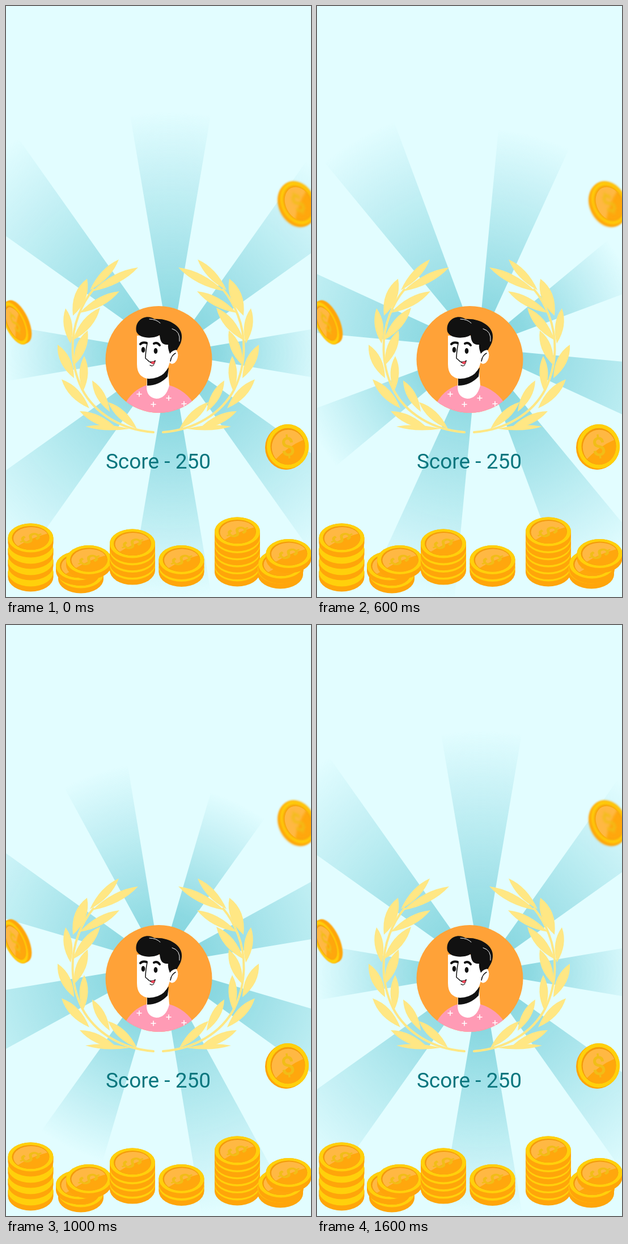
An HTML page with a canvas that plays this animation: 538x1040 px, repeating every 1.8 s.

```html
<!DOCTYPE html>
<html lang="en">
<head>
<meta charset="utf-8">
<title>Score</title>
<style>
  html, body { margin: 0; width: 100%; height: 100%; overflow: hidden; background: #e2fdff; }
  canvas { position: absolute; left: 0; top: 0; }
</style>
</head>
<body>
<canvas id="rays" width="538" height="1040"></canvas>
<canvas id="art" width="538" height="1040"></canvas>
<script>
const TAU = Math.PI * 2, DEG = Math.PI / 180;
const rays = document.getElementById('rays').getContext('2d');
const art = document.getElementById('art').getContext('2d');

// Turn in degrees for each 200 ms step; the last step rests at the start pose.
const TURNS = [0, 5, 14, 30, 47, 64, 82, 93, 0];
// Per ray, counter-clockwise from the right: start length, end length, strong part.
const RAYS = [
  [280, 325, .3], [415, 338, .1], [425, 425, .05], [465, 465, .1],
  [295, 380, .3], [445, 445, .1], [430, 450, .25], [440, 440, .1]
];

function drawRays(turn) {
  rays.clearRect(0, 0, 538, 1040);
  rays.save();
  rays.translate(270, 618);
  rays.rotate(-turn * DEG);
  rays.translate(20, -7);
  RAYS.forEach(([from, to, hold], i) => {
    const length = from + (to - from) * Math.min(1, turn / 82);
    const glow = rays.createRadialGradient(0, 0, 0, 0, 0, length);
    glow.addColorStop(0, 'rgb(127,211,221)');
    glow.addColorStop(hold, `rgba(127,211,221,${1 - hold * .45})`);
    glow.addColorStop(1, 'rgba(127,211,221,0)');
    rays.fillStyle = glow;
    rays.beginPath();
    rays.moveTo(0, 0);
    rays.arc(0, 0, length, -i * 45 * DEG - .168, -i * 45 * DEG + .168);
    rays.fill();
  });
  rays.restore();
}

function fill(color, d) {
  art.fillStyle = color;
  art.fill(new Path2D(d));
}
function stroke(color, width, d) {
  art.strokeStyle = color;
  art.lineWidth = width;
  art.stroke(new Path2D(d));
}
function ellipse(color, x, y, rx, ry, angle = 0) {
  art.fillStyle = color;
  art.beginPath();
  art.ellipse(x, y, rx, ry, angle, 0, TAU);
  art.fill();
}

// Left half of the wreath: base x, y, tip x, y, fullness.
const LEAVES = [
  [148, 500, 199, 446, 14], [152, 502, 233, 460, 15],
  [118, 545, 143, 480, 20], [130, 540, 200, 502, 15],
  [114, 594, 105, 532, 15], [118, 588, 166, 531, 17],
  [120, 655, 91, 596, 17], [120, 632, 144, 571, 17],
  [147, 708, 98, 657, 16], [136, 678, 138, 616, 15],
  [196, 744, 130, 713, 15], [183, 714, 152, 659, 15],
  [231, 744, 180, 697, 15], [218, 744, 140, 740, 9]
];
function halfWreath() {
  for (const [x, y, tx, ty, w] of LEAVES) {
    const dx = tx - x, dy = ty - y, len = Math.hypot(dx, dy);
    const nx = -dy / len * w, ny = dx / len * w;
    const mx = x + dx * .55, my = y + dy * .55;
    fill('#ffe784', `M${x} ${y}Q${mx + nx} ${my + ny} ${tx} ${ty}Q${mx - nx} ${my - ny} ${x} ${y}`);
  }
  stroke('#ffe784', 4, 'M260 750C205 746 157 718 134 674C112 628 114 580 128 544Q138 518 154 499');
}

function avatar() {
  art.save();
  art.beginPath();
  art.arc(269.5, 622, 94, 0, TAU);
  art.clip();
  art.fillStyle = '#ffa238';
  art.fillRect(170, 520, 200, 200);
  fill('#ff9bb5', 'M208 704Q222 675 249 667H287Q318 676 334 704V720H208Z');
  fill('#fff', 'M249 640H286L288 668Q282 691 265 691Q249 689 248 672Z');
  fill('#111', 'M249 655Q272 656 287 636L285 652Q270 668 249 668Z');
  ellipse('#fff', 295, 617, 8, 13, .25);
  fill('#fff', 'M231 580H288L290 620Q286 655 252 656Q231 654 231 630Z');
  fill('#111', 'M230 573C226 552 248 541 262 551C286 549 312 563 310 584C309 596 304 599 302 605Q294 605 289 612Q285 602 286 596C275 597 272 590 271 579C261 586 235 586 230 573Z');
  stroke('#fff', 1, 'M253 551Q265 551 272 558M293 568Q308 572 306 590');
  stroke('#111', 1.5, 'M249 594Q246 609 246 620L252 625M290 625Q292 614 299 611');
  stroke('#111', 4, 'M237 595Q241 591 248 593M261 594Q267 591 271 597');
  ellipse('#111', 242, 605, 3.3, 5);
  ellipse('#111', 264, 607, 3.3, 5);
  fill('#111', 'M249 624Q257 628 264 623Q263 632 258 630Z');
  fill('#f0475b', 'M255 628Q258 624 263 626Q261 631 258 630Z');
  stroke('#111', 1.2, 'M254 632Q258 635 261 631');
  for (const [x, y] of [[235, 683], [260, 701], [287, 690], [314, 700]])
    stroke('#fff', 1.6, `M${x - 4} ${y}h8M${x} ${y - 4}v8`);
  art.restore();
}

// A coin face of unit radius 40, squeezed to rx by ry, with its rim shifted by the depth.
function coin(x, y, rx, ry, { tilt = 0, sign = 58, depthX = 0, depthY = 9, blur = 0, face = true } = {}) {
  art.save();
  if (blur) art.filter = `blur(${blur}px)`;
  art.translate(x, y);
  art.rotate(tilt * DEG);
  for (let i = 0; i <= 4; i++)
    ellipse('#ffa50a', depthX * i / 4, depthY * i / 4, rx, ry);
  ellipse('#ffd00b', 0, 0, rx, ry);
  if (face) {
    art.scale(rx / 40, ry / 40);
    ellipse('#f39a0c', 0, 0, 33, 33);
    ellipse('#ffa70d', 1, 1.5, 31.5, 31.5);
    art.save();
    art.beginPath();
    art.arc(1, 1.5, 31.5, 0, TAU);
    art.clip();
    fill('#ffb843', 'M-40 -40H40L30 -12Q0 0 -26 26H-40Z');
    art.restore();
    art.rotate(sign * DEG);
    art.fillStyle = '#f1bd17';
    art.font = '500 47px Roboto, sans-serif';
    art.fillText('$', 0, 17);
  }
  art.restore();
}
function stack(x, top, count, step) {
  for (let i = count - 1; i >= 0; i--)
    coin(x, top + i * step, 40, 25.5, { face: !i });
}

function drawArt() {
  art.textAlign = 'center';
  art.lineCap = 'round';
  halfWreath();
  art.save();
  art.translate(537, 0);
  art.scale(-1, 1);
  halfWreath();
  art.restore();
  avatar();

  art.fillStyle = '#0a767e';
  art.font = '37px Roboto, sans-serif';
  art.fillText('Score - 250', 268.5, 814);

  coin(515, 347, 29, 39, { tilt: -27, sign: 0, depthX: -5, depthY: 2, blur: 2.2 });
  coin(16, 558, 17, 40, { tilt: -25, sign: 0, depthX: 7, depthY: 0, blur: .8 });
  coin(497, 775, 37, 39, { sign: -8, depthX: -3, depthY: 2 });

  stack(43.5, 936, 4, 20);
  stack(132, 999, 1, 0);
  stack(128, 985, 1, 0);
  stack(146, 974.5, 1, 0);
  stack(223, 946, 4, 12.7);
  stack(309.5, 974.5, 2, 13);
  stack(408, 925, 6, 12.4);
  stack(484, 991, 1, 0);
  stack(485, 982, 1, 0);
  stack(498.5, 963.5, 1, 0);
}

function frame() {
  drawRays(TURNS[Math.floor(performance.now() % 1800 / 200)]);
  requestAnimationFrame(frame);
}
drawArt();
frame();
</script>
</body>
</html>
```
